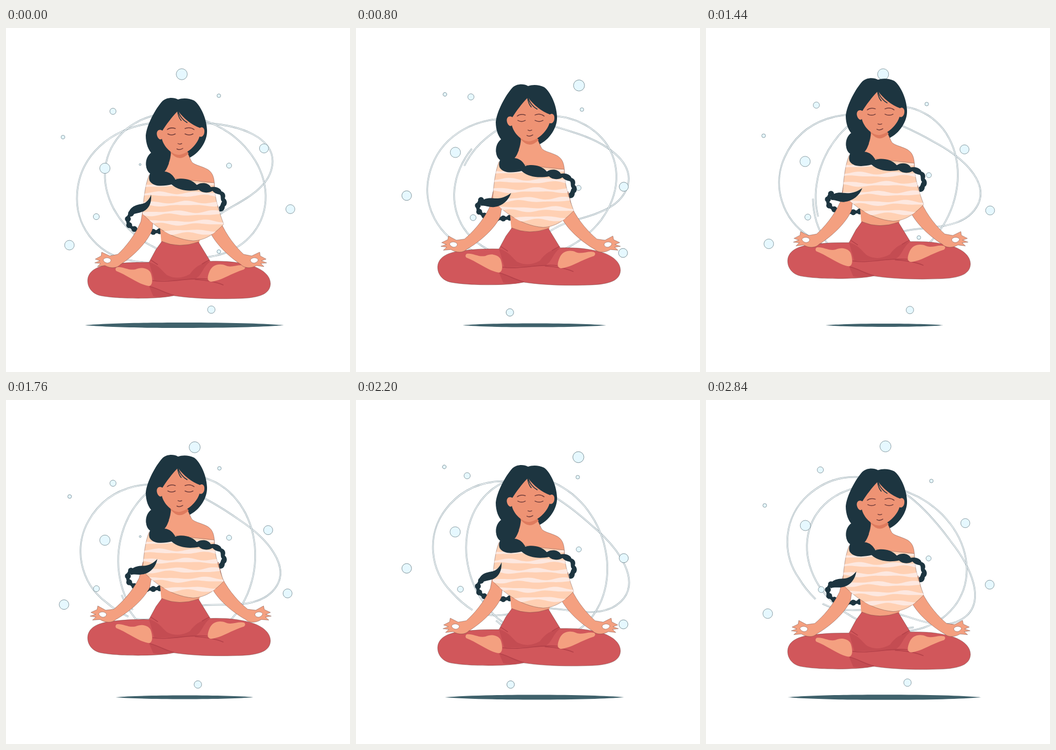
Animation of 640x640 px, one loop 2880 ms. Source, as an HTML page:

```html
<!DOCTYPE html>
<html lang="en">
<head>
<meta charset="utf-8">
<title>Floating meditation</title>
<style>
  html, body { margin: 0; width: 100%; height: 100%; overflow: hidden; background: #fff; }
  svg { display: block; width: 100vw; height: 100vh; }
  .line { fill: none; stroke: #8c9fa7; stroke-width: 2.8; }
  .core { fill: none; stroke: #fafdfe; stroke-width: 1.4; }
  .bubble { fill: #e6f8ff; stroke: #71878f; stroke-width: .8; }
  .hair { fill: #1d3540; }
  .skin { fill: #f4a080; }
  .face { fill: #ee9374; }
  .shade { fill: #df7b5e; }
  .pants { fill: #d1575b; }
  .fold { fill: #c44c52; }
  .edge { stroke: #5a3836; stroke-width: .6; stroke-opacity: .7; }
  .crease, .ink, .strand { fill: none; stroke-linecap: round; }
  .crease { stroke: #b5424a; stroke-width: 1.6; }
  .ink { stroke: #713d3b; stroke-width: 1.5; }
  .strand { stroke: #1d3540; }
</style>
</head>
<body>
<svg viewBox="0 0 640 640">
  <defs>
    <path id="poncho" d="M266 274C258 295 256 320 254 346C272 363 302 392 348 396C375 395 392 378 405 365C398 345 388 320 387 288L330 282Z"/>
    <clipPath id="ponchoClip"><use href="#poncho"/></clipPath>
    <g id="arm">
      <path class="skin edge" d="M256 330L251 360C240 386 222 408 208 421L193 424L178 417L177 424L166 430L175 433L165 437L176 438L170 444L184 442C195 448 207 447 213 440C236 425 262 400 272 376L276 335Z"/>
      <path d="M181 431C184 426 193 427 195 431C196 435 191 438 187 437C184 436 181 434 181 431Z" fill="#fff" class="edge"/>
    </g>
  </defs>
  <g id="ringA"></g>
  <g id="ringB"></g>
  <g id="orbit"></g>
  <g id="drift"></g>
  <path id="ground" fill="#3f616b" d="M-185 0C-150 -3 -90 -5 0 -5S150 -3 185 0C150 3 90 5 0 5S-150 3 -185 0Z"/>
  <g id="body">
    <path class="strand" stroke-width="6" d="M286 378C262 382 240 378 230 368C224 360 226 350 234 344"/>
    <path class="strand" stroke-width="11" stroke-dasharray="0 12" d="M286 378C262 382 240 378 230 368C224 360 226 350 234 344"/>
    <path class="skin" d="M286 365L289 400Q324 410 359 400L363 385Z"/>
    <path class="shade" d="M286 369Q306 394 362 394L366 382Z"/>
    <path class="pants edge" d="M290 397Q322 411 358 398L380 434C410 433 440 436 462 444C483 452 492 464 492 476C491 491 480 501 440 503C390 505 345 503 312 498C280 505 205 504 176 498C158 494 151 480 152 468C154 450 172 442 200 439Q232 435 266 436L279 412Z"/>
    <path class="fold" d="M266 436C284 440 290 452 300 460Q320 470 342 458C352 444 362 438 380 434C364 447 366 460 350 468L276 470Z"/>
    <path class="fold" d="M266 480Q285 486 312 497Q295 503 274 499Z"/>
    <path class="crease" d="M273 470C305 475 345 463 374 467M268 481C285 485 295 494 312 497M352 468C372 469 388 471 404 478M270 432Q276 436 282 440M378 432Q371 435 365 439"/>
    <path class="skin" d="M206 445C217 443 228 452 241 449C253 443 268 448 270 458C273 468 273 479 266 480C248 478 228 461 205 452Q202 448 206 445Z"/>
    <path class="skin" d="M443 442C432 439 419 447 409 442C398 437 384 440 379 452C374 463 374 471 381 472C399 471 420 456 443 449Q447 445 443 442Z"/>
    <g class="swing"><use href="#arm"/></g>
    <g transform="translate(650 0) scale(-1 1)"><g class="swing"><use href="#arm"/></g></g>
    <path class="hair" d="M320 133C312 128 298 129 291 136C278 150 262 180 260 200C260 215 265 228 272 234C258 242 258 262 267 270L305 270L338 243C362 233 375 208 374 190C373 165 360 142 350 135C340 130 328 130 320 133Z"/>
    <path class="skin edge" d="M307 228C306 250 300 262 285 272L280 300L388 300C388 280 386 270 375 263C360 255 347 255 344 246L336 228Z"/>
    <path class="shade" d="M306 231Q322 252 340 233L333 226H310Z"/>
    <path class="face" d="M320 154C308 166 298 180 291 191C284 187 279 192 281 200C283 207 288 209 290 206C293 220 308 236 322 236C338 234 355 218 360 202C366 204 370 198 369 190C368 184 363 184 361 186C345 180 330 168 320 154Z"/>
    <path class="strand" stroke-width="1.6" d="M320 154C323 165 331 173 337 176M319 154Q321 167 326 172"/>
    <path class="ink" d="M300 189Q306 184 315 187M333 187Q342 183 350 189"/>
    <path class="ink" d="M301 197Q308 201 315 197M333 197Q341 201 348 197"/>
    <path class="ink" stroke-width="1.2" d="M320 215Q323 217 327 215M318 225Q323 228 329 224"/>
    <use href="#poncho" fill="#ffd0b3" class="edge"/>
    <g id="stripes" clip-path="url(#ponchoClip)" fill="#fde8e0"></g>
    <path class="hair" d="M270 232C292 232 300 242 303 252C300 260 298 264 295 267C305 268 311 274 315 282C326 278 345 280 355 292C364 286 377 288 381 296C391 294 399 298 401 304C408 306 409 312 407 317C413 322 411 330 407 332C407 339 402 343 397 341L396 333C400 331 399 326 402 323C398 319 401 313 398 310C392 309 388 307 384 303C376 308 365 307 359 301C344 304 322 304 308 291C295 294 274 297 267 284C265 278 267 274 268 270C258 262 257 242 270 232Z"/>
    <path id="tail" class="hair"/>
  </g>
</svg>
<script>
const LOOP = 2880, STEP = 40;
const $ = id => document.getElementById(id);
const rad = deg => deg * Math.PI / 180;
const wave = deg => (1 - Math.cos(rad(deg))) / 2;
const lerp = (a, b, k) => a + (b - a) * k;

function add(parent, tag, attrs) {
  const el = document.createElementNS("http://www.w3.org/2000/svg", tag);
  for (const name in attrs) el.setAttribute(name, attrs[name]);
  return parent.appendChild(el);
}

// Phase in degrees at a time, from [ms, degrees] steps.
function phase(steps, t) {
  const i = steps.findIndex(s => s[0] > t);
  const [t0, a] = steps[i - 1], [t1, b] = steps[i];
  return lerp(a, b, (t - t0) / (t1 - t0));
}
const orbitSteps = [[0, 0], [480, 100.6], [800, 180], [1120, 259.4], [1760, 422], [2200, 526], [2840, 688], [2880, 698]];
const driftSteps = [[0, 0], [480, 79], [800, 148], [1120, 212], [1760, 352], [2200, 448.5], [2840, 584], [2880, 593]];

function addRing(id, d) {
  for (const name of ["line", "core"]) add($(id), "path", { class: name, d });
}
addRing("ringA", "M300 432C345 415 360 372 400 345C435 322 495 300 496 248C496 205 440 181 373 177C340 174 300 172 265 178C200 187 132 235 132 318C132 375 175 425 235 433Q260 438 285 436");

const spiral = Array.from({ length: 91 }, (_, i) => {
  const a = rad(-121 - 374 * i / 90), k = lerp(1.02, .98, i / 90);
  return `${(154 * k * Math.cos(a)).toFixed(1)} ${(128 * k * Math.sin(a)).toFixed(1)}`;
});
addRing("ringB", "M" + spiral.join("L"));

const bubble = (parent, cx, cy, r) => add(parent, "circle", { class: "bubble", cx, cy, r });
[[327, 86, 10.3], [480, 224, 8.5], [118, 404, 9], [529, 337, 8.4], [382, 524, 7], [106, 203, 3.5]]
  .forEach(b => bubble($("orbit"), ...b));

// x, y, radius, end x, end y, pace
const drifters = [
  [396, 126, 3.4, 421.5, 153, .6], [199, 155, 5.8, 215, 126, 1], [184, 261, 9.6, 185, 229, 1],
  [168, 351, 5.6, 222, 353, 1], [415, 256, 4.8, 414, 301, 1], [249.5, 254, 1.8, 290, 254, 1], [396, 416, 3.5, 396, 350, 1]
].map(([x, y, r, x2, y2, pace]) => ({ el: bubble($("drift"), x, y, r), x, y, x2, y2, pace }));

for (let row = 0; row < 6; row++) {
  const y = 292 + row * 17.5, top = [], bottom = [];
  for (let x = 248; x <= 412; x += 4) {
    const mid = y + 1.6 * Math.sin(x / 13 + row * 2);
    const half = 3 + 1.2 * Math.sin(x / 9 + row);
    top.push(`${x} ${mid - half}`);
    bottom.unshift(`${x} ${mid + half}`);
  }
  add($("stripes"), "path", { d: "M" + top.concat(bottom).join("L") + "Z" });
}

const tailUp = "M228 343C234 330 244 329 254 327C262 325 267 318 270 310C271 322 268 335 256 341C246 345 238 345 231 349Z";
const tailDown = "M231 354C236 345 248 344 256 346C270 348 282 346 294 338C288 352 274 362 258 363C250 364 240 357 234 358Z";
const tailEnds = tailDown.match(/\d+/g);
function tailPath(k) {
  let i = 0;
  return tailUp.replace(/\d+/g, n => lerp(+n, +tailEnds[i++], k).toFixed(1));
}

const move = (el, value) => el.setAttribute("transform", value);

function draw(t) {
  const rise = wave(.1371 * t);
  move($("body"), `translate(0 ${-37.5 * rise})`);
  move($("ground"), `translate(332 553) scale(${1 - .416 * rise})`);
  move($("ringA"), `rotate(${.0169 * t} 318 312)`);
  move($("ringB"), `translate(335 294) rotate(${26 - .0625 * t})`);
  move($("orbit"), `rotate(${24.1 * wave(phase(orbitSteps, t))} 322 302.4)`);

  const q = wave(phase(driftSteps, t));
  for (const b of drifters) {
    const k = q ** b.pace;
    b.el.setAttribute("cx", lerp(b.x, b.x2, k));
    b.el.setAttribute("cy", lerp(b.y, b.y2, k));
  }

  const swing = 4.2 * wave(360 * t / 1225);
  document.querySelectorAll(".swing").forEach(el => move(el, `rotate(${swing} 262 312)`));
  $("tail").setAttribute("d", tailPath(wave(360 * t / 2330)));
}

const start = performance.now();
function tick() {
  const t = (performance.now() - start) % LOOP;
  draw(Math.floor(t / STEP) * STEP);
  requestAnimationFrame(tick);
}
tick();
</script>
</body>
</html>
```
